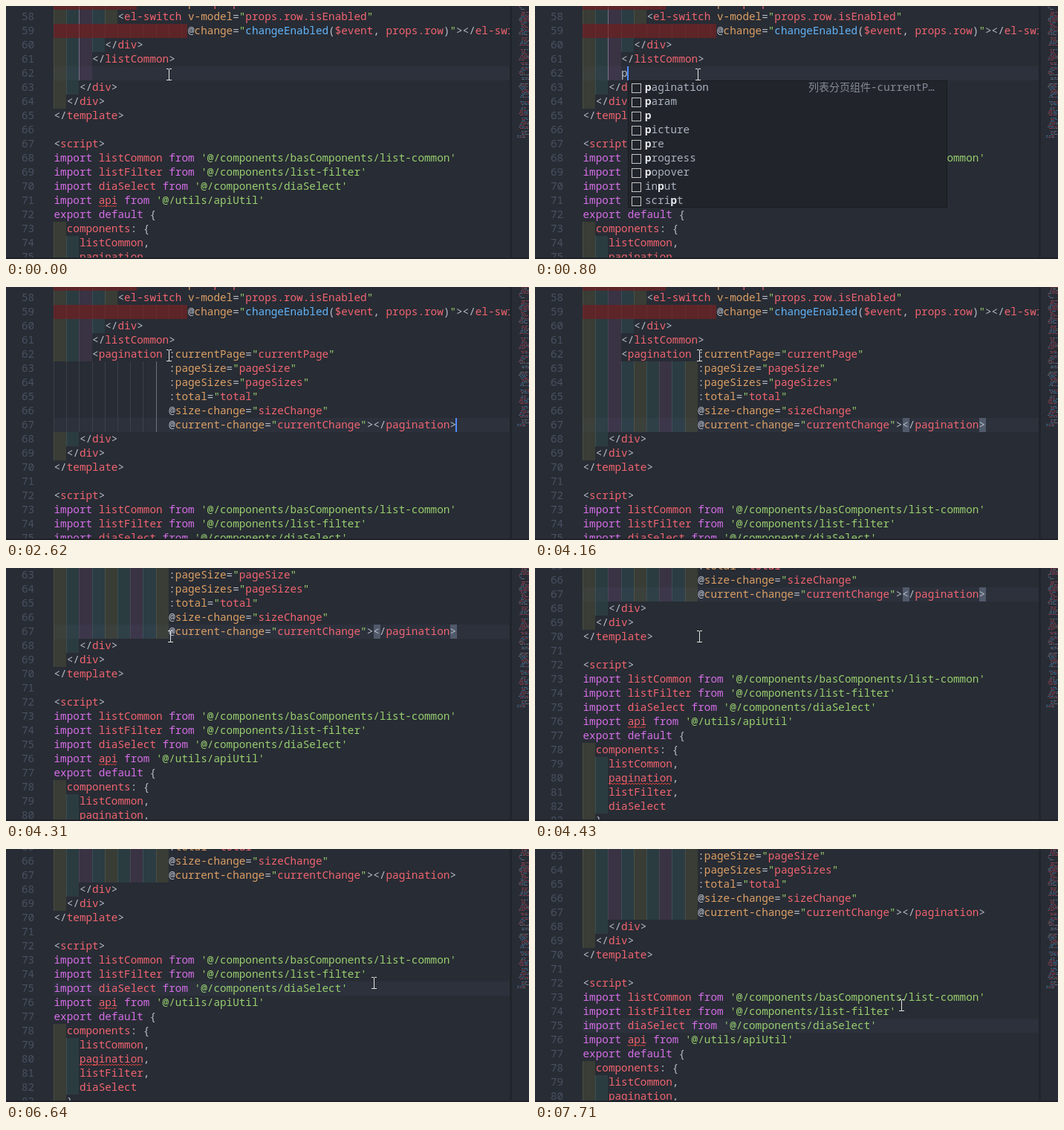
Write an HTML page with a canvas that moves like this. It is 704 by 340 pixels and loops after 8000 ms.

```html
<!DOCTYPE html>
<html lang="en">
<head>
<meta charset="utf-8">
<title>Editor snippet</title>
<style>
  html, body { margin: 0; width: 704px; height: 340px; overflow: hidden; background: #282c34; }
  canvas { display: block; }
</style>
</head>
<body>
<canvas id="stage" width="704" height="340"></canvas>
<script>
const g = document.getElementById('stage').getContext('2d');
const LOOP = 8000, LEFT = 64.5, CHAR = 8.595, ROW = 19, FIRST = 57, EDGE = 680;
const MONO = '14.325px "Noto Sans Mono", "DejaVu Sans Mono", monospace';
const CJK = '14px "Noto Sans CJK SC", "Noto Sans CJK JP", sans-serif';
const COLORS = { w: '#b6bdca', r: '#f06470', p: '#d56ee8', g: '#98cf6f', o: '#dca066', b: '#61b5fa' };
const RAINBOW = ['255,255,64', '79,236,200', '255,127,255', '79,236,236'];

// Markup: ^x switches to colour x.
const close = name => `^w</^r${name}^w>`;
const attr = (mark, name, value) => `^w${mark}^o${name}^w=^g"^r${value}^g"`;
const load = (name, path) => `^pimport ^r${name} ^pfrom ^g'@/${path}'`;

// Each line is [indent, markup, column range of a squiggle].
const head = [
  [13, attr('', 'slot-scope', 'props') + '^w>'],
  [10, '^w<^rel-switch ' + attr('', 'v-model', 'props.row.isEnabled')],
  [21, '^w@^ochange^w=^g"^bchangeEnabled^w(^r$event^w, ^rprops.row^w)^g"^w>' + close('el-switch')],
  [8, close('div')],
  [6, close('listCommon')]
];
const snippet = [
  [6, '^w<^rpagination ' + attr(':', 'currentPage', 'currentPage')],
  [18, attr(':', 'pageSize', 'pageSize')],
  [18, attr(':', 'pageSizes', 'pageSizes')],
  [18, attr(':', 'total', 'total')],
  [18, attr('@', 'size-change', 'sizeChange')],
  [18, attr('@', 'current-change', 'currentChange') + '^w>' + close('pagination')]
];
const tail = [
  [4, close('div')],
  [2, close('div')],
  [0, close('template')],
  [0, ''],
  [0, '^w<^rscript^w>'],
  [0, load('listCommon', 'components/basComponents/list-common')],
  [0, load('listFilter', 'components/list-filter')],
  [0, load('diaSelect', 'components/diaSelect')],
  [0, load('api', 'utils/apiUtil'), [7, 10]],
  [0, '^pexport default ^w{'],
  [2, '^rcomponents^w: {'],
  [4, '^rlistCommon^w,'],
  [4, '^rpagination^w,', [4, 14]],
  [4, '^rlistFilter^w,'],
  [4, '^rdiaSelect'],
  [2, '^w},']
];
const suggestions = ['pagination', 'param', 'p', 'picture', 'pre', 'progress', 'popover', 'input', 'script'];

const typedKeys = [[0, ''], [800, 'p'], [920, 'pa'], [1070, 'pan']];
const scrollKeys = [[0, 0], [4310, 100], [4430, 150], [6890, 100]];
const mouseKeys = [
  [0, 219, 92], [4160, 221, 92], [4710, 233, 111], [4850, 261, 172], [5000, 300, 193],
  [5120, 395, 187], [5270, 453, 182], [5550, 506, 173], [5700, 503, 176], [5820, 500, 178],
  [6090, 495, 180], [7440, 495, 183], [7560, 494, 190], [7710, 493, 210]
];
const caretOn = [[400, 1480], [2060, 2470], [2620, 3170], [3610, 4040],
  [4580, 5000], [5550, 5970], [6240, 6640], [7170, 7710]];

const at = (keys, t) => keys.findLast(k => k[0] <= t);
const colX = col => LEFT + col * CHAR;

function rect(color, x, y, w, h) {
  g.fillStyle = color;
  g.fillRect(x, y, w, h);
}

function write(text, x, y, color, font = MONO) {
  g.font = font;
  g.fillStyle = color;
  [...text].forEach((c, i) => c !== ' ' && g.fillText(c, x + i * CHAR, y));
}

function writeMarkup(markup, col, y) {
  const parts = markup.split(/\^(.)/);
  for (let i = 1; i < parts.length; i += 2) {
    write(parts[i + 1], colX(col), y, COLORS[parts[i]]);
    col += parts[i + 1].length;
  }
}

function drawIndent(indent, y, tinted, active) {
  for (let c = 0; c < indent; c += 2) {
    const x = Math.round(colX(c) - 0.5), next = Math.round(colX(Math.min(c + 2, indent)) - 0.5);
    rect(c === active ? '#6b717d' : '#3b4048', x, y, 1, ROW);
    if (tinted) {
      const tint = indent % 2 ? '128,32,32,.6' : RAINBOW[c / 2 % 4] + ',.08';
      rect(`rgba(${tint})`, x, y, next - x, ROW);
    }
  }
}

function drawSquiggle([from, to], y) {
  g.beginPath();
  for (let x = colX(from), up = 0; x <= colX(to); x += 2, up ^= 1) g.lineTo(x, y + 16 + up * 2);
  g.strokeStyle = '#e0443e';
  g.lineWidth = 1;
  g.stroke();
}

// Columns in which the typed letters occur, in order, or null.
function match(word, typed) {
  const hits = [];
  for (const c of typed) {
    const i = word.indexOf(c, hits.length ? hits.at(-1) + 1 : 0);
    if (i < 0) return null;
    hits.push(i);
  }
  return hits;
}

function drawPopup(typed) {
  const x = Math.round(colX(6 + typed.length)), top = 100;
  const items = suggestions.filter(word => match(word, typed));
  rect('#181a1f', x, top, 430, items.length * ROW);
  rect('#21252b', x + 1, top + 1, 428, items.length * ROW - 2);
  items.forEach((word, row) => {
    const y = top + row * ROW, hits = match(word, typed);
    g.strokeStyle = '#c5c5c5';
    g.lineWidth = 1;
    g.strokeRect(x + 5.5, y + 4.5, 12, 12);
    [...word].forEach((c, i) => {
      const hit = hits.includes(i);
      write(c, x + 23 + i * CHAR, y + 14, hit ? '#e6e8ec' : '#abb2bf', hit ? 'bold ' + MONO : MONO);
    });
  });
  g.font = CJK;
  g.fillStyle = '#858b96';
  g.fillText('列表分页组件', x + 243, top + 14);
  write('-currentP…', x + 327, top + 14, '#858b96');
}

function drawMinimap(shift) {
  const rand = n => { const v = Math.sin(n * 91.7) * 4373.3; return v - Math.floor(v); };
  rect('#282c34', EDGE, 0, 24, 340);
  rect('#21242b', EDGE - 2, 0, 3, 340);
  g.globalAlpha = 0.45;
  for (let i = -5; i < 90; i++) {
    if (rand(i + 40) < 0.2) continue;
    let x = i > 86 ? 688 : 690 + Math.round(4 * Math.abs(Math.sin(i * 0.35)));
    const end = i > 86 ? 697 : x + 3 + rand(i) * 12;
    for (let k = 0; x < end; k++) {
      const w = 2 + Math.floor(rand(i * 7 + k) * 4);
      rect(['#ef596f', '#61afef', '#abb2bf', '#ef596f'][Math.floor(rand(i * 3 + k) * 4)], x, i * 2 + shift, w, 1);
      x += w + 1;
    }
  }
  g.globalAlpha = 1;
}

function drawMouse(x, y) {
  rect('#e4e4e4', x, y - 7, 1, 15);
  for (const end of [y - 8, y + 7]) {
    rect('#e4e4e4', x - 3, end, 3, 1);
    rect('#e4e4e4', x + 1, end, 3, 1);
  }
}

function draw(t) {
  const inserted = t >= 2620, moved = t >= 6240;
  const typed = at(typedKeys, t)[1], scroll = at(scrollKeys, t)[1];
  const lines = [...head, ...(inserted ? snippet : [[6, '^w' + typed]]), ...tail];
  const [line, col] = moved ? [75, 46] : inserted ? [67, 63] : [62, 6 + typed.length];
  const top = n => 5 + (n - 58) * ROW - scroll;
  const y = top(line);

  rect('#282c34', 0, 0, 704, 340);
  rect('#2c313c', 64, y, EDGE - 64, ROW);
  if (t >= 2740 && !moved) {
    for (const c of [50, 62]) rect('#515a6b', Math.ceil(colX(c)), y, 9, ROW);
  }
  lines.forEach(([indent, markup, wave], i) => {
    const n = FIRST + i, ly = top(n);
    if (ly < -ROW || ly > 340) return;
    const fresh = inserted && t < 2740 && n > 62 && n < 68;
    const active = fresh ? 16 : !inserted && n < 63 ? 4 : -1;
    drawIndent(indent, ly, !fresh, active);
    write(String(n), 21, ly + 14, '#495162');
    writeMarkup(markup, indent, ly + 14);
    if (wave) drawSquiggle(wave, ly);
  });
  if (caretOn.some(([from, to]) => t >= from && t < to)) {
    rect('#528bff', Math.round(colX(col) - 0.5), y, 2, ROW);
  }
  drawMinimap(inserted ? 10 : 0);
  if (typed && !inserted) drawPopup(typed);
  rect('#1f2229', 0, 338, 704, 2);
  const [, mx, my] = at(mouseKeys, t);
  drawMouse(mx, my);
}

const start = performance.now();
function tick() {
  draw((performance.now() - start) % LOOP);
  requestAnimationFrame(tick);
}
tick();
</script>
</body>
</html>
```
